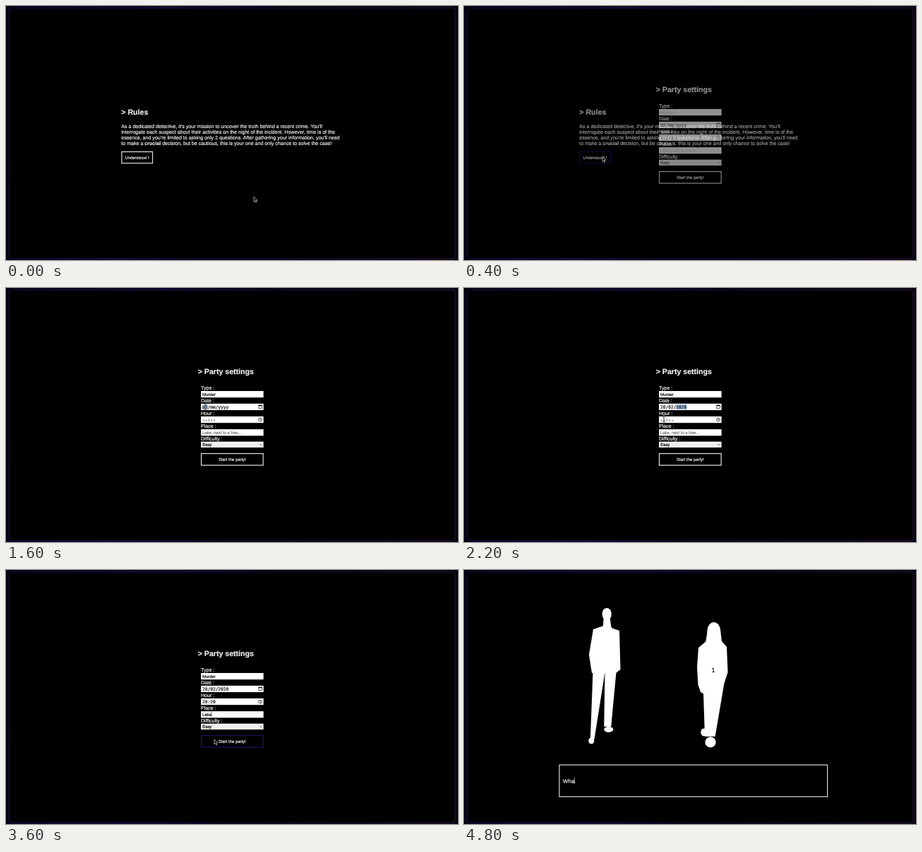
An HTML page with a canvas that plays this animation: 640 px wide and 360 px high, repeating every 5000 ms.

```html
<!DOCTYPE html>
<html lang="en">
<head>
<meta charset="utf-8">
<title>Detective game</title>
<style>
  html, body { margin: 0; width: 100%; height: 100%; overflow: hidden; background: #000; }
  canvas { display: block; width: 640px; height: 360px; }
</style>
</head>
<body>
<canvas id="stage" width="640" height="360"></canvas>
<script>
const ctx = document.getElementById('stage').getContext('2d');
const LOOP = 5000, STEP = 200;
const SANS = '"Liberation Sans", Arial, sans-serif';
const MONO = '"DejaVu Sans Mono", monospace';
const WHITE = '#f0f0f0', GREY = '#757575', HOVER = '#17175a', INK = '#111';
const BODY = 7.08, SMALL = 5.9, TITLE = 10.6, DATE = 6.2, CHAT = 7.93;
const FADE = 400, FORM = 600, TALK = 3800;
ctx.textRendering = 'geometricPrecision';

// Text boxes and buttons: x, y, width, height
const box = (y, h = 9.2) => [276, y, 88.6, h];
const TYPE = box(146), DAY = box(163.9), HOUR = box(182), PLACE = box(200.2), LEVEL = box(217.7, 8.4);
const CHATBOX = [135, 276.3, 379.6, 45];
const OK = [163.9, 206.6, 43.6, 16.2], START = [276.5, 234.6, 87.6, 16.6];

// Each answer: when its box is clicked, when typing starts, letters per step
const answer = (text, focus, start, rate) => ({ text, focus, start, rate });
const KIND = answer('Murder', 800, 1000, 2);
const DATED = answer('20/02/2020', 1600, 1800, 5);
const TIMED = answer('20:20', 2400, 2600, 3);
const SPOT = answer('Lake', 3000, 3200, 2);
const SPEECH = answer('Wha', 4400, 4600, 1.5);
const ANSWERS = [KIND, DATED, TIMED, SPOT, SPEECH];

// Where the pointer rests: time, x, y
const STOPS = [
  [0, 351, 270.5], [200, 196, 213.5], [600, 305.5, 142], [800, 287, 152],
  [1400, 282.5, 168.6], [2200, 283, 186], [2800, 286.2, 207], [3400, 287, 227],
  [3600, 295, 240], [4000, 264.4, 289.8], [4200, 257.7, 298.5]
];

const typed = (a, t) => a.text.slice(0, Math.max(0, Math.floor((t - a.start) / STEP) + 1) * a.rate);
const focused = (a, t) => ANSWERS.filter(b => t >= b.focus).pop() === a;
const inside = ([x, y, w, h], px, py) => px > x && px < x + w && py > y && py < y + h;

function pointerAt(t) {
  const [at, x, y] = STOPS.filter(s => t >= s[0]).pop();
  const hidden = ANSWERS.some(a => a.start > at && t >= a.start);
  return { x, y, hidden };
}

function text(str, x, y, size, color = WHITE, weight = '', family = SANS) {
  ctx.font = `${weight} ${size}px ${family}`;
  ctx.fillStyle = ctx.strokeStyle = color;
  ctx.lineWidth = 0.2;
  ctx.fillText(str, x, y);
  ctx.strokeText(str, x, y);
  return ctx.measureText(str).width;
}

function rect(x, y, w, h, color) {
  ctx.fillStyle = color;
  ctx.fillRect(x, y, w, h);
}

function frame(area, color, width = 1.2) {
  ctx.strokeStyle = color;
  ctx.lineWidth = width;
  ctx.strokeRect(...area);
}

function line(color, width, ...pts) {
  ctx.strokeStyle = color;
  ctx.lineWidth = width;
  ctx.beginPath();
  pts.forEach(p => ctx.lineTo(...p));
  ctx.stroke();
}

function shape(color, ...pts) {
  ctx.fillStyle = color;
  ctx.beginPath();
  pts.forEach(p => ctx.lineTo(...p));
  ctx.closePath();
  ctx.fill();
}

function oval(x, y, rx, ry) {
  ctx.fillStyle = '#fff';
  ctx.beginPath();
  ctx.ellipse(x, y, rx, ry, 0, 0, Math.PI * 2);
  ctx.fill();
}

// Tapered upright part between two half-widths
function limb(x1, y1, r1, x2, y2, r2) {
  shape('#fff', [x1 - r1, y1], [x1 + r1, y1], [x2 + r2, y2], [x2 - r2, y2]);
}

function backdrop() {
  rect(0, 0, 640, 360, '#05030f');
  const glow = ctx.createLinearGradient(0, 0, 640, 120);
  glow.addColorStop(0, '#0a061f');
  glow.addColorStop(0.35, '#0f0c36');
  glow.addColorStop(0.55, '#0a061f');
  glow.addColorStop(1, '#150a20');
  ctx.beginPath();
  ctx.roundRect(6, 4, 629, 353, 4);
  ctx.strokeStyle = glow;
  ctx.lineWidth = 6;
  ctx.stroke();
  ctx.fillStyle = '#000';
  ctx.fill();
}

function button(area, label, x, p) {
  frame(area, inside(area, p.x, p.y) ? HOVER : '#e2e2e2');
  text(label, x, area[1] + area[3] / 2 + 2.1, SMALL);
}

function rules(p) {
  const left = 163.3, pitch = 8.17, top = 172.8;
  text('> Rules', left, 154.4, TITLE, WHITE, 'bold');
  [
    "As a dedicated detective, it's your mission to uncover the truth behind a recent crime. You'll",
    'interrogate each suspect about their activities on the night of the incident. However, time is of the',
    "essence, and you're limited to asking only 2 questions. After gathering your information, you'll need"
  ].forEach((s, i) => text(s, left, top + i * pitch, BODY));
  const y = top + 3 * pitch;
  let x = left + text('to make a ', left, y, BODY);
  x += text('crucial', x, y, BODY, WHITE, 'bold');
  text(' decision, but be cautious, this is your one and only chance to solve the case!', x, y, BODY);
  button(OK, 'Understood !', 168.5, p);
}

// Typed answer with its caret, or a grey hint while empty
function entry(a, t, hint, x, y, size, color) {
  const value = typed(a, t);
  const w = value ? text(value, x, y, size, color) : 0;
  if (!value) text(hint, x, y, size, GREY);
  if (focused(a, t)) rect(x + w, y - size * 0.95, 0.6, size * 1.2, color);
}

function field(area, a, t, hint) {
  rect(...area, '#fff');
  entry(a, t, hint, 278, area[1] + 6.6, SMALL, INK);
}

// Date or time field with the part being typed highlighted
function segments(area, a, t, blank, sep) {
  const y = area[1], cw = DATE * 0.602, n = typed(a, t).length;
  rect(...area, '#fff');
  if (focused(a, t)) {
    const from = blank.lastIndexOf(sep, n) + 1;
    const len = blank.slice(from).split(sep)[0].length;
    rect(278 + from * cw, y + 1, len * cw, 7.2, '#a5c8f2');
  }
  text(typed(a, t) + blank.slice(n), 278, y + 6.7, DATE, INK, '', MONO);
}

function calendar() {
  frame([357.9, 166.2, 4.4, 4.6], INK, 0.7);
  rect(357.6, 165.8, 5, 1.5, INK);
}

function clock() {
  ctx.strokeStyle = INK;
  ctx.lineWidth = 0.7;
  ctx.beginPath();
  ctx.arc(359.9, 186.6, 2.4, 0, Math.PI * 2);
  ctx.stroke();
  line(INK, 0.6, [359.9, 185], [359.9, 186.8], [361.2, 187.3]);
}

function settings(t, p) {
  text('> Party settings', 271.7, 122, TITLE, WHITE, 'bold');
  ['Type', 'Date', 'Hour', 'Place', 'Difficulty'].forEach((label, i) =>
    text(label + ' :', 276, 144.2 + i * 17.95, BODY));
  field(TYPE, KIND, t, 'Murder');
  segments(DAY, DATED, t, 'dd/mm/yyyy', '/');
  calendar();
  segments(HOUR, TIMED, t, '--:--', ':');
  clock();
  field(PLACE, SPOT, t, 'Lake, next to a tree...');
  rect(...LEVEL, '#efefef');
  text('Easy', 278.2, 224, SMALL, INK);
  line('#333', 0.7, [359.4, 221.2], [361, 222.8], [362.6, 221.2]);
  button(START, 'Start the party!', 301, p);
}

function suit() {
  oval(202.2, 62.5, 6.6, 8.8);
  limb(202.3, 68, 4.5, 202.5, 83, 6);
  shape('#fff', [198, 79], [207, 79], [210, 82.5], [220, 86], [221.5, 141],
    [215, 146], [181, 146], [177, 120], [183, 84]);
  limb(191, 145, 8.5, 181.7, 240, 2.8);
  limb(207.5, 145, 8, 203.3, 222, 5);
  oval(180.3, 242, 4, 4.5);
  oval(204.8, 226, 6.5, 4);
}

function coat() {
  oval(353.8, 87, 9.5, 13);
  limb(354, 87, 9.3, 353.5, 106, 12);
  shape('#fff', [343, 101], [365, 101], [372, 109], [373.5, 145], [368, 162],
    [340, 176], [335, 173], [331.5, 163], [330, 138], [332, 110]);
  limb(353.5, 160, 15, 348.3, 236, 7.3);
  oval(339.8, 230, 4.5, 5.5);
  oval(349, 244, 7.6, 7.5);
}

function suspects(t) {
  suit();
  coat();
  text('1', 350.6, 145, 9, INK);
  frame(CHATBOX, '#d8d8d8');
  entry(SPEECH, t, 'Type here to talk to Suspect 1...', 140, 301.6, CHAT, WHITE);
}

function arrow(x, y) {
  const tip = [[0, 0], [0, 6.8], [1.5, 5.5], [2.7, 8.1], [3.8, 7.6], [2.7, 5.1], [4.7, 5], [0, 0]]
    .map(([dx, dy]) => [x + dx, y + dy]);
  shape('#000', ...tip);
  line('#ddd', 0.7, ...tip);
}

function beam(x, y) {
  for (const [color, width] of [['#ddd', 1.6], [INK, 0.7]]) {
    line(color, width, [x, y - 3.4], [x, y + 3.4]);
    for (const s of [-1, 1])
      line(color, width, [x - 1.7, y + s * 4], [x, y + s * 3.4], [x + 1.7, y + s * 4]);
  }
}

function draw(now) {
  const t = Math.floor((now % LOOP) / STEP) * STEP;
  const p = pointerAt(t);
  const fading = t >= FADE && t < FORM;
  backdrop();
  ctx.globalAlpha = fading ? 0.56 : 1;
  if (t < FORM) rules(p);
  if (t >= FADE && t < TALK) settings(t, p);
  if (t >= TALK) suspects(t);
  ctx.globalAlpha = 1;
  if (p.hidden) return;
  const fields = t >= TALK ? [CHATBOX] : t >= FORM ? [TYPE, DAY, HOUR, PLACE] : [];
  const mark = fields.some(f => inside(f, p.x, p.y)) ? beam : arrow;
  mark(p.x, p.y);
}

const start = performance.now();
function tick() {
  draw(performance.now() - start);
  requestAnimationFrame(tick);
}
tick();
</script>
</body>
</html>
```
